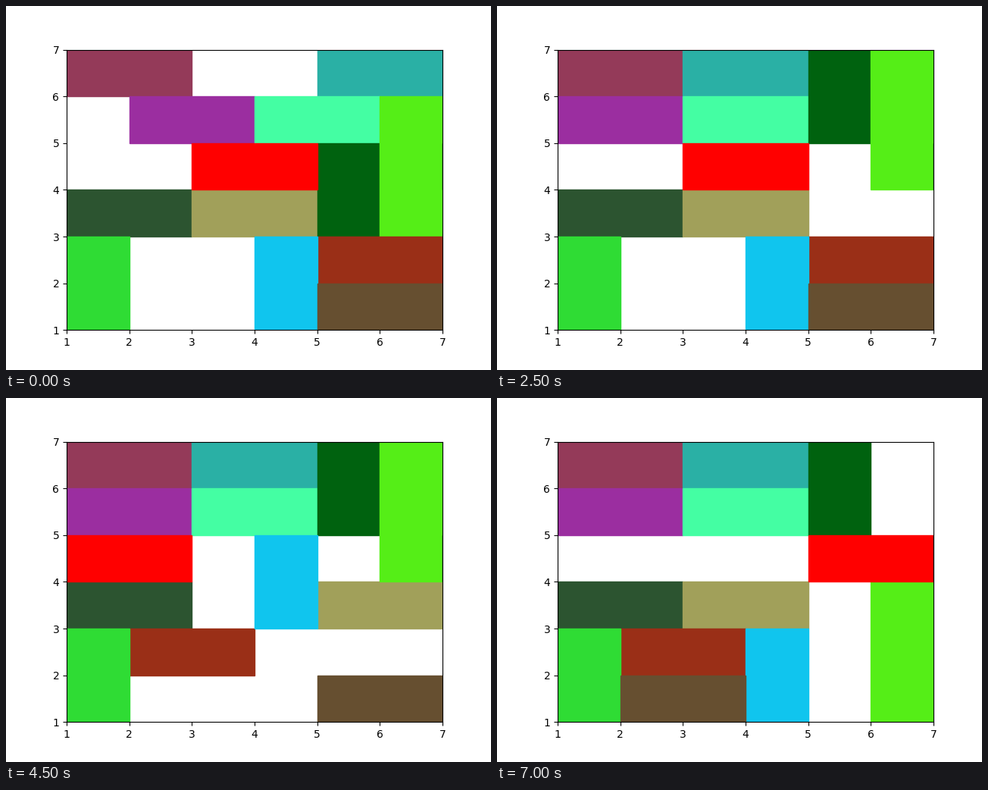
A matplotlib script that plays this animation: 640 by 480 pixels, repeating every 7500 ms.

```python
import matplotlib.pyplot as plt
from matplotlib.animation import FuncAnimation
from matplotlib.patches import Rectangle

# name: (x, y, width, height, colour), listed in stacking order
CARS = {
    "maroon": (1, 6, 2, 1, "#943a59"),
    "teal": (5, 6, 2, 1, "#2ab0a5"),
    "purple": (2, 5, 2, 1, "#9b2ea0"),
    "mint": (4, 5, 2, 1, "#44fea3"),
    "pine": (1, 3, 2, 1, "#2c5430"),
    "khaki": (3, 3, 2, 1, "#a1a05a"),
    "forest": (5, 3, 1, 2, "#00620f"),
    "lime": (6, 3, 1, 3, "#55ee17"),
    "rust": (5, 2, 2, 1, "#9a2f17"),
    "green": (1, 1, 1, 2, "#2fdc34"),
    "cyan": (4, 1, 1, 2, "#10c5ee"),
    "brown": (5, 1, 2, 1, "#664f30"),
    "red": (3, 4, 2, 1, "#ff0000"),
}

# one slide per step: (car, dx, dy)
MOVES = [
    ("teal", -2, 0),
    ("purple", -1, 0),
    ("mint", -1, 0),
    ("forest", 0, 2),
    ("lime", 0, 1),
    ("khaki", 2, 0),
    ("red", -2, 0),
    ("cyan", 0, 2),
    ("rust", -3, 0),
    ("brown", -3, 0),
    ("cyan", 0, -2),
    ("khaki", -2, 0),
    ("lime", 0, -3),
    ("red", 4, 0),
]

fig, ax = plt.subplots(figsize=(6.4, 4.8), dpi=100)
ax.set_xlim(1, 7)
ax.set_ylim(1, 7)

patches = {
    name: ax.add_patch(Rectangle((x, y), w, h, color=color))
    for name, (x, y, w, h, color) in CARS.items()
}
# exit on the right wall
ax.add_patch(Rectangle((7, 4), 1, 1, color="black"))


def update(step):
    pos = {name: car[:2] for name, car in CARS.items()}
    for name, dx, dy in MOVES[:step]:
        x, y = pos[name]
        pos[name] = (x + dx, y + dy)
    for name, patch in patches.items():
        patch.set_xy(pos[name])
    return list(patches.values())


anim = FuncAnimation(
    fig,
    update,
    frames=len(MOVES) + 1,
    init_func=lambda: update(0),
    interval=500,
    repeat=True,
    repeat_delay=0,
)
plt.show()
```
